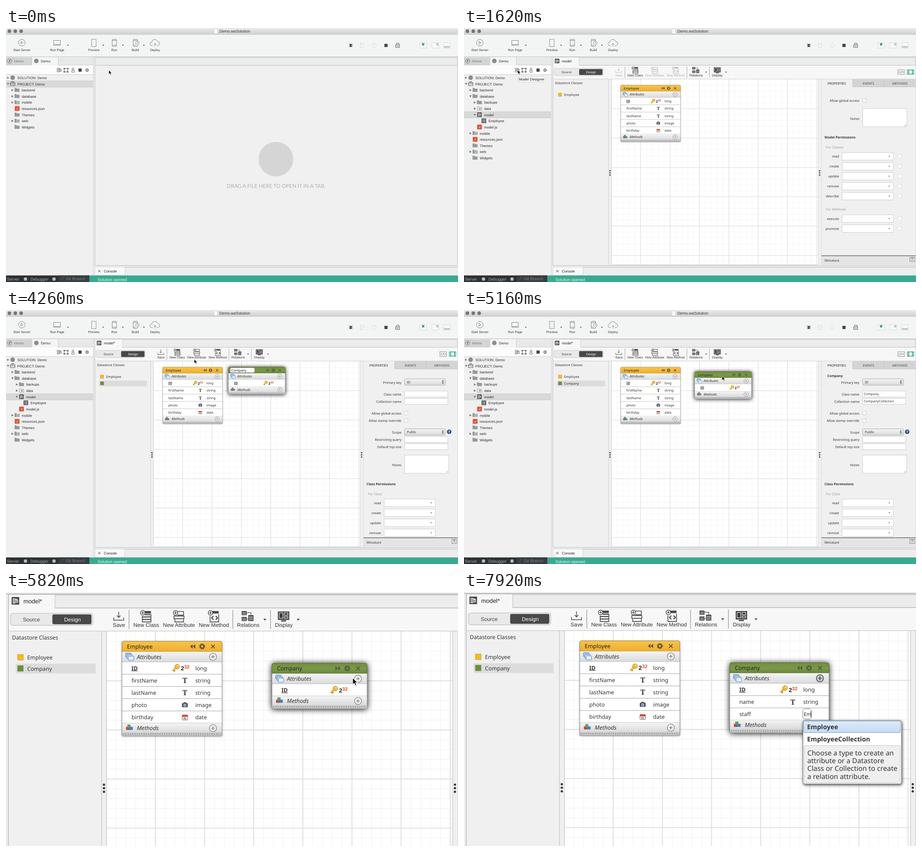
Recreate the animation shown at these times as an HTML page. Size 998 px wide and 561 px high, loop 8 s.

```html
<!DOCTYPE html>
<html lang="en">
<head>
<meta charset="utf-8">
<title>Model designer</title>
<style>
html, body { margin: 0; width: 100%; height: 100%; overflow: hidden; background: #f0f0f0; }
svg { display: block; width: 100vw; height: 100vh; font-family: "Liberation Sans", Arial, sans-serif; text-rendering: geometricPrecision; }
text { white-space: pre; }
.n { font-family: "Noto Sans", "Open Sans", sans-serif; }
.b { font-weight: 700; }
.e { text-anchor: end; }
.m { text-anchor: middle; }
.i { font-style: italic; }
</style>
</head>
<body>
<svg viewBox="0 0 998 561">
  <defs>
    <linearGradient id="bar" x2="0" y2="1"><stop stop-color="#ebebeb"/><stop offset="1" stop-color="#d0d0d0"/></linearGradient>
    <linearGradient id="row" x2="0" y2="1"><stop stop-color="#f4f4f4"/><stop offset="1" stop-color="#dadbdd"/></linearGradient>
    <linearGradient id="gold" x2="0" y2="1"><stop stop-color="#f7c44c"/><stop offset="1" stop-color="#eeae2c"/></linearGradient>
    <linearGradient id="green" x2="0" y2="1"><stop stop-color="#6f8d3c"/><stop offset=".5" stop-color="#7b9a49"/><stop offset="1" stop-color="#698739"/></linearGradient>
    <linearGradient id="blue" x2="0" y2="1"><stop stop-color="#dfebfa"/><stop offset="1" stop-color="#c4daf4"/></linearGradient>
    <clipPath id="panel"><path d="M789 113h208v389h-208z"/></clipPath>
  </defs>
  <g id="view"><g id="chrome"></g><g id="tree"></g><g id="main"></g><g id="company"></g><g id="tip"></g><g id="cursor"></g></g>
  <g id="popup"></g>
</svg>
<script>
const $ = id => document.getElementById(id);
const LOOP = 8000, STEP = 60, ZOOM = 1.674, K = 1 / ZOOM;

// drawing helpers: y of a text is its middle line
const T = (x, y, s, z = 7.1, c = '#333', cls = '', a = '') =>
  `<text x="${x}" y="${y + z * .36}" font-size="${z}" fill="${c}" class="${cls}" ${a}>${s}</text>`;
const N = (x, y, s, z = 7.3, c = '#333', cls = '', a = '') => T(x, y, s, z, c, 'n ' + cls, a);
const R = (x, y, w, h, f, a = '') => `<rect x="${x}" y="${y}" width="${w}" height="${h}" fill="${f}" ${a}/>`;
const B = (x, y, w, h, f = '#fff', s = '#c4c4c4', r = 0, sw = .8) =>
  R(x, y, w, h, f, `stroke="${s}" stroke-width="${sw}" rx="${r}"`);
const C = (x, y, r, f, a = '') => `<circle cx="${x}" cy="${y}" r="${r}" fill="${f}" ${a}/>`;
const L = (d, s = '#666', w = .8, a = '') => `<path d="${d}" fill="none" stroke="${s}" stroke-width="${w}" ${a}/>`;
const F = (d, f = '#555', a = '') => `<path d="${d}" fill="${f}" ${a}/>`;
const at = (x, y, s, html, a = '') => `<g transform="translate(${x} ${y}) scale(${s})" ${a}>${html}</g>`;
const caret = (x, y, c = '#444') => F(`M${x - 2} ${y - 1}h4l-2 2.4z`, c);
const gear = (r, c) => C(0, 0, r * .62, 'none', `stroke="${c}" stroke-width="${r * .45}"`) +
  C(0, 0, r * .9, 'none', `stroke="${c}" stroke-width="${r * .3}" stroke-dasharray="${r * .36} ${r * .347}"`);
const modelIcon = (x, y) => at(x, y, 1, R(-5, -5, 10, 10, '#4b4b4b') +
  L('M-3-2.5h2.5v2h-2.5zM-3 1h2.5v2h-2.5zM1-1h2v3H1zM-.5-2H2v1', '#fff', .8));

function chrome() {
  let s = R(0, 0, 998, 561, '#f0f0f0') + R(0, 0, 998, 14, 'url(#bar)') + R(0, 14, 998, 49, '#f3f5f5') +
    L('M0 14.2H998', '#bcbcbc') + L('M0 63.6H998', '#bbb', 1);
  for (const x of [7.5, 20.5, 33.5]) s += C(x, 7, 3.9, '#79727e');
  s += F('M459.5 2h5l2.5 2.5V12.3h-7.5z', '#fff', 'stroke="#bbb" stroke-width=".5"') + T(471, 7, 'Demo.waSolution', 8.7);
  for (const [x, n] of [[35, 'Start Server'], [113, 'Run Page'], [194, 'Preview'], [239, 'Run'], [285.5, 'Build'], [329, 'Deploy']])
    s += T(x, 48, n, 7.1, '#333', 'm');
  for (const x of [136.5, 214.5, 258, 304.5]) s += caret(x, 38);
  s += C(35, 32.5, 7.3, 'none', 'stroke="#666" stroke-width=".8"') + L('M33 29.5l4.8 3-4.8 3z') +
    B(105.5, 27.5, 14.5, 10.5, '#f8f8f8', '#666') + L('M105.5 36.5h14.5', '#999', 1.4) +
    L('M189 25h10v16h-10z', '#555', 1, 'stroke-dasharray="2 1"') +
    B(234.5, 25, 9.5, 15.5, 'none', '#666', 1) + L('M234.5 27.5h9.5M234.5 38h9.5') +
    B(281, 25, 9.5, 15.5, 'none', '#666', 1) + L('M281 27.5h9.5M281 38h5') +
    C(290, 33.5, 4, '#f3f5f5', 'stroke="#777" stroke-width=".7"') + L('M290 31v2.5h2') +
    L('M324 39h-1.5a4 4 0 0 1-.5-8a6.5 6.5 0 0 1 12.5-1.5a4.7 4.7 0 0 1 0 9.5h-1.5M329 41v-7M326.5 36.5l2.5-2.5 2.5 2.5');
  s += F('M759 35h4.5v7h-4.5z', '#555') + L('M757 34l8.5 8M765.5 34l-8.5 8M756.5 38h9.5', '#555') +
    L('M790 34h-7.5v9h7.5M787 38.5h5', '#ccc') + C(813, 38.5, 4.5, 'none', 'stroke="#ccc" stroke-width=".8"') +
    R(835.5, 35, 7, 7, '#444') + L('M860.5 37h8.5v6h-8.5zM861.5 37l1-3.5h5l1 3.5M862.5 40h4.5', '#555', 1);
  for (const [x, px, py, w, h, c] of [[914, 918.5, 33.5, 5, 5, '#2f9f88'], [940, 950, 33.5, 5, 5, '#c5c5c5'], [966, 967, 40, 13, 3.5, '#c5c5c5']])
    s += B(x, 32.5, 15, 12, '#f8f8f8', '#d2d2d2') + R(px, py, w, h, c);
  // left side
  s += R(0, 65, 192, 18, '#e8e8e8') + R(0, 65, 57, 17, '#d4d4d4') + R(57, 64.5, 58.5, 18.5, '#f4f4f4') +
    L('M57 64.5v17.5H0M115.5 64.5v17.5H192', '#c0c0c0') +
    C(8, 72.8, 4.8, 'none', 'stroke="#666" stroke-width=".9"') + F('M6 75l1.3-3.5 3-1.5-1.3 3.4z', '#555') + T(18, 73, 'Home', 7.9, '#777') +
    C(67, 72.8, 5, '#8b8b8b') + T(77, 73, 'Demo', 7.9) + R(0, 82.5, 192, 20, '#fcfcfc') + L('M0 103H192', '#c4c4c4') +
    L('M113 89h4.5v3H113zM113 94h4.5v3H113zM119 91h3v5h-3zM117.5 90h3v1', '#555', .9) +
    L('M128.5 89.5h8v7.5h-8z', '#555', 1) + L('M127 89.5h3M135 89.5h3M127 97h3M135 97h3', '#444', 1.8) +
    C(148, 90.5, 2.2, 'none', 'stroke="#555" stroke-width=".9"') + L('M145 97.5v-2q0-2.5 3-2.5t3 2.5v2z', '#555', .9) +
    R(160, 89.5, 7, 7, '#444') + at(179, 93, 1, gear(3.7, '#777'));
  // right side and bottom
  s += L('M193 64V546', '#c2c2c2') + R(196, 65, 801, 17, '#ececec') + L('M196.2 65V524.5H997V65zM196 82.3H997', '#bdbdbd', 1) +
    R(196, 528, 802, 18.5, '#ededed') + L('M196 528H998', '#c4c4c4', 1.4) + R(196.5, 527.5, 66, 19, '#f8f8f8', 'stroke="#c8c8c8" stroke-width=".7"') +
    L('M203 534.5l3 2.5-3 2.5M209 534.5l-3 2.5 3 2.5', '#555', 1) + T(216, 537.2, 'Console', 7.9, '#222') +
    R(0, 546.5, 184, 15, '#2c3133') + R(116, 546.5, 68, 15, '#373d40') + R(184, 546.5, 814, 15, '#3aa991') +
    T(2, 555, 'Server', 9.1, '#a8adb0') + T(54, 555, 'Debugger', 9.1, '#a8adb0') + T(132, 554, 'Git Branch', 9.1, '#7d8386') +
    R(39.5, 551, 7, 7, '#b9bcbe', 'rx="2"') + R(102.5, 551, 7, 7, '#b9bcbe', 'rx="2"') +
    L('M120 556h3l3-5h3', '#6d7376', 1, 'stroke-dasharray="2 1"') + T(202, 555.5, 'Solution opened', 9, '#eefaf6');
  return s;
}

// label, depth, arrow (1 closed, 2 open), icon
const CLOSED = [['SOLUTION: Demo', 0, 1, 'logo'], ['PROJECT: Demo', 0, 2, 'case'], ['backend', 1, 1, 'dir'], ['database', 1, 1, 'dir'],
  ['mobile', 1, 1, 'dir+'], ['resources.json', 1, 0, 'js'], ['Themes', 1, 0, 'dir'], ['web', 1, 1, 'dir+'], ['Widgets', 1, 0, 'dir']];
const OPEN = [...CLOSED.slice(0, 3), ['database', 1, 2, 'dir'], ['backups', 2, 1, 'dir'], ['data', 2, 1, 'file'], ['model', 2, 2, 'model'],
  ['Employee', 3, 0, 'table'], ['model.js', 2, 0, 'js'], ...CLOSED.slice(4)];
const dir = F('M-5.5-4.5h4l1 1.5h6v7h-11z', '#959a99');
const ICONS = {
  logo: C(0, 0, 5, '#8b8b8b'),
  case: L('M-5-3H5V4H-5zM-2-3v-2h4v2M-5 0H5', '#555', 1),
  dir, 'dir+': dir + R(-1, -3, 4.5, 6, '#d5d8d8') + R(.3, -2, 2, 4, '#8e9393'),
  file: L('M-4.5-4h3.5l1 1.5h5v6.5h-9.5z', '#888') + R(-1, -1, 4, 3, '#999'),
  js: R(-5, -5.2, 10.4, 10.4, '#df5037') + L('M1-2v3.5h-2.5', '#fff', .9),
  model: modelIcon(0, 0),
  table: R(-5, -5, 10, 10, '#4b4b4b') + L('M-3-2.5h2M0-2.5h3M-3 0h2M0 0h3M-3 2.5h2M0 2.5h3', '#fff', 1.2),
};
function tree(rows, sel) {
  const bar = 110 + 13.62 * sel;
  return R(0, bar - 6.8, 192, 13.6, '#d9d9d9') + L(`M0 ${bar - 6.8}H192M0 ${bar + 6.8}H192`, '#c2c2c2', .7) +
    rows.map(([name, d, arrow, icon], i) => {
      const y = 110 + 13.62 * i, x = 4.5 + 9.7 * d;
      return (arrow === 1 ? F(`M${x - 2} ${y - 2.6}l4.6 2.6-4.6 2.6z`, '#777') : arrow ? F(`M${x - 2.6} ${y - 2}h5.2l-2.6 4.4z`, '#777') : '') +
        at(x + 10.2, y - .3, 1, ICONS[icon]) + T(25 + 9.7 * d, y + .2, name, 7.8, '#2a2a2a');
    }).join('');
}

const empty = () => C(596, 289.7, 38.3, '#d5d5d5') +
  T(596.5, 348.5, 'DRAG A FILE HERE TO OPEN IT IN A TAB.', 11.6, '#b0b0b0', 'm', 'style="font-family:Lato,sans-serif"');

// toolbar icons, drawn around their middle at zoomed size
const plusDot = C(-7.5, -8, 5, '#fafafa', 'stroke="#444" stroke-width="1.4"') + L('M-10.5-8h6M-7.5-11v6', '#444', 1.4);
const tableHead = R(-4, -12, 14.5, 5.5, '#4a4a4a') + L('M-8.5-1V12H10.5V-5', '#4a4a4a', 1.6);
const TOOLS = {
  Save: L('M-.5-10V2M-4.5-2l4 4 4-4M-11.5 2v6H10.5V2', '#4a4a4a', 1.5),
  'New Class': tableHead + L('M-3-4H10M-8.5 1H10.5M-8.5 6.5H10.5', '#4a4a4a', 2.2) + plusDot,
  'New Attribute': L('M-3-11h13v8H-3M-11-1h22v6h-22zM-9 6v6H10V6', '#4a4a4a', 1.6) + plusDot,
  'New Method': tableHead + L('M-1-1l-4 4 4 4M4-1l4 4-4 4', '#4a4a4a', 2.2) + plusDot,
  Relations: R(-14.5, -12, 11, 9, '#4a4a4a') + R(-14.5, 1, 11, 9, '#4a4a4a') + R(0, -3, 11.5, 13, '#4a4a4a') +
    L('M-13-8.5h8M-13-5.500h8M-13 4.500h8M-13 7.500h8M1.500 1h8.500M1.500 4h8.500M1.500 7h8.500'.replaceAll('500', '5'), '#eee', 1) +
    L('M-4-8.5H6v5.500M-4 5.5h4', '#4a4a4a', 1.2),
  Display: R(-13, -11, 25, 18.5, '#3c3c3c') + L('M-10-8h8v12h-8zM1-8h8v5H1zM1 0h8v4H1z', '#eee', 1.2) + R(-6, 8.5, 11, 2.5, '#3c3c3c'),
};
const tool = (x, name, on, hot) => (hot ? R(359, 82.5, 38, 29, '#cfcfcf') : '') +
  at(x, 93.5, .6, TOOLS[name], on || hot ? '' : 'opacity=".35"') + T(x, 104.5, name, 7.1, hot ? '#888' : on ? '#333' : '#b0b0b0', 'm');

// a class card at zoomed size
const TYPES = {
  text: T(0, 0, 'T', 16, '#3a3a3a', 'm b', 'style="font-family:\'Noto Serif\',serif"'),
  photo: R(-6.5, -4, 13, 9, '#4a5560', 'rx="1.5"') + R(-3, -6, 6, 3, '#4a5560') + C(0, .5, 3, '#cfe0ee') + C(0, .5, 1.5, '#4a5560'),
  date: B(-6, -5, 12, 11, '#fff', '#7a4a40', 1, 1) + R(-6, -5, 12, 4, '#cf4a32') + T(0, 2.5, '01', 6, '#333', 'm b'),
};
const key = (x, y) => at(x, y, 1, L('M3-3l-9 9M-4 4l3 3', '#c98a1c', 3.6) + L('M3-3l-9 9', '#f6c04a', 2) +
  C(4, -3.5, 5.3, '#f3b83c', 'stroke="#c98a1c"') + C(5.5, -5, 1.3, '#fff'));
const input = (x, y, w, s, z = 12.2) => B(x, y, w, 22.5, '#fff', '#777', 4.5, 1) + N(x + 2, y + 12, s, z);
const plus = (x, y, hot) => C(x, y, 7.8, hot ? '#ccc' : '#fafafa', `stroke="${hot ? '#555' : '#999'}" stroke-width="1.8"`) +
  L(`M${x - 4} ${y}h8M${x} ${y - 4}v8`, hot ? '#444' : '#888', 1.8);
function card({ x, y, w, fill, name, typing, open = true, rows, live, hot }) {
  const end = 45.5 + 27.1 * rows.length, h = end + 28;
  const shadow = live ? '0 1.5px 7px #000' : '0 1px 2px rgba(0,0,0,.45)';
  const mark = live ? '#545c40' : '#5f5540';
  const head = `M0 23V4q0-4 4-4H${w - 4}q4 0 4 4V23z`;
  let s = R(0, 0, w, h, '#fff', `rx="3" style="filter:drop-shadow(${shadow})"`) +
    F(head, `url(#${fill})`) + L(head, live ? '#4f6130' : '#8f7436', .9) +
    (typing ? B(7, 2.5, 90, 18, '#fff', '#777', 4, 1) : '') + N(11, 11.8, name, 12.4, '#222') +
    F(open ? `M${w - 65} 6.5v10l-5.5-5zM${w - 59} 6.5v10l-5.5-5z` : `M${w - 70} 6.5v10l5.5-5zM${w - 64} 6.5v10l5.5-5z`, mark) +
    at(w - 44, 11.5, 1, gear(6.3, mark)) + L(`M${w - 24} 7.5l8 8M${w - 16} 7.5l-8 8`, mark, 2) +
    R(0, 23, w, 22.5, 'url(#row)') + L(`M0 45.5H${w}`, '#aaa') +
    B(8, 26, 12, 9, '#a9c8ee', '#4f80bd', 1, 1) + B(11, 29.5, 12, 9, '#c4dbf5', '#4f80bd', 1, 1) + B(14, 33, 12, 9, '#e8f2fd', '#4f80bd', 1, 1) +
    N(33, 34.3, 'Attributes', 12.6, '#333', 'i') + plus(w - 20, 34.3, hot);
  rows.forEach(([label, kind, type, edit, w2], i) => {
    const top = 45.5 + 27.1 * i, mid = top + 13.9;
    s += L(`M0 ${top + 27.1}H${w}`, '#999', .9);
    if (edit === 'name') s += input(20, top + 2, 75, label);
    else s += N(21, mid, label, 12.2, '#333', kind === 'key' ? 'b' : '', kind === 'key' ? 'text-decoration="underline"' : '');
    if (edit === 'type') s += input(161, top + 2, w2, type, 11.4);
    else if (open) s += N(162, mid, type, 12.2);
    if (kind === 'key') {
      const kx = open ? 118 : 136;
      s += key(kx, mid) + T(kx + 12, mid + .5, '2', 13, '#222', 'b') + T(kx + 19.3, mid - 3, '32', 10.8, '#d8502c', 'b');
    } else if (kind) s += at(139, mid, 1, TYPES[kind]);
  });
  s += R(0, end, w, 20, 'url(#row)') + R(9, end + 8, 8, 7, '#cf4338', 'rx="1"') + R(12, end + 3, 7, 7, '#5aa84f', 'rx="1"') + R(16, end + 8, 8, 7, '#4a7fc6', 'rx="1"') +
    N(33, end + 10.8, 'Methods', 12.6, '#333', 'i') + plus(w - 20, end + 10.8) +
    R(0, end + 20, w, 8, '#c9c9cb') + L(`M3 ${end + 24}H${w - 2}`, '#8c8c8c', 2.5, 'stroke-dasharray="2 3"') +
    L(`M0 23V${h}H${w}V23`, '#888', .9);
  return at(x, y, K, s);
}
const EMPLOYEE = card({ x: 346, y: 126.2, w: 221, fill: 'gold', name: 'Employee', rows: [['ID', 'key', 'long'],
  ['firstName', 'text', 'string'], ['lastName', 'text', 'string'], ['photo', 'photo', 'image'], ['birthday', 'date', 'date']] });

// property panel parts
const check = (x, y, c = '#bbb') => B(x, y - 4, 7.8, 7.8, '#fff', c, 1.5);
const access = (names, y0, box) => names.map((n, i) => {
  const y = y0 + 22 * i;
  return N(828, y, n, 7.3, '#333', 'e') + B(835, y - 8.3, 113, 16.6) + caret(939, y, '#777') + (box ? check(958, y, '#d4d4d4') : '');
}).join('');
const grip = (x, y) => L(`M${x - 4} ${y}l4-4M${x - 2} ${y}l2-2`, '#888', .7);
const modelPanel = () => N(873, 160, 'Allow global access', 7.3, '#333', 'e') + check(880.5, 160) + N(873, 200, 'Notes', 7.3, '#333', 'e') +
  B(880.5, 178, 97.5, 40) + grip(976.5, 216.5) + N(796, 241, 'Model Permissions', 7.3, '#333', 'b') + N(799.5, 263.5, 'For Classes', 7.3, '#999') +
  access(['read', 'create', 'update', 'remove', 'describe'], 283.5, true) + N(799.5, 400.5, 'For Methods', 7.3, '#999') + access(['execute', 'promote'], 421, true);
function classPanel(name) {
  const pick = (y, s) => B(880, y - 7, 90, 14, 'url(#row)', '#999', 2) + N(885, y, s) + F(`M962.5 ${y - 1}l2-3 2 3zM962.5 ${y + 1}l2 3 2-3z`, '#333');
  const field = (y, s) => B(880, y - 6.5, 95.5, 13) + N(883, y - .5, s);
  return [['Primary key', 160], ['Class name', 186], ['Collection name', 202], ['Allow global access', 228], ['Allow stamp override', 244.5],
    ['Scope', 270], ['Restricting query', 286.5], ['Default top size', 302.5], ['Notes', 342.5]].map(([s, y]) => N(873, y, s, 7.3, '#333', 'e')).join('') +
    N(802, 145.5, name, 7.3, '#333', 'b') + pick(159, 'ID') + field(185.5, name) + field(201.7, name && name + 'Collection') + check(879.5, 228) + check(879.5, 244.5) +
    pick(269.5, 'Public') + C(978.5, 269, 5, '#2c4f9e') + T(978.5, 269, '?', 8, '#fff', 'm b') + field(286, '') + field(302, '') +
    B(880, 320.5, 97.5, 40) + grip(976, 359) + N(796, 384, 'Class Permissions', 7.3, '#333', 'b') + N(799.5, 406, 'For Class', 7.3, '#999') +
    access(['read', 'create', 'update', 'remove'], 426);
}

function grid() {
  let minor = '', major = '';
  for (let i = 1; i < 36; i++) {
    const p = 12.96 * i, line = `M${325.4 + p} 113V523` + (p < 410 ? `M326 ${113.5 + p}H782` : '');
    if (i % 5) minor += line; else major += line;
  }
  return R(326, 113, 456.5, 410, '#fff') + L(minor, '#f2f2f2', .7) + L(major, '#e1e1e1', 1.3);
}
const GRID = grid();
const tab = dirty => R(196.6, 64.5, dirty ? 61 : 57.5, 18.5, '#f7f7f7', 'stroke="#c4c4c4" stroke-width=".7"') +
  R(197, 81.5, dirty ? 60 : 56.5, 2, '#f7f7f7') + modelIcon(205.5, 72.8) + T(216, 73, dirty ? 'model*' : 'model', 7.9, '#222');
const swatch = (y, c, name) => R(208.3, y - 3.9, 7.6, 7.6, c, 'stroke="#666" stroke-opacity=".5" stroke-width=".5"') + N(221, y + .2, name);

function designer({ dirty, added, hover, name }) {
  let s = tab(dirty) + R(197, 83, 800, 29.5, '#f7f7f7') + B(199.2, 89.3, 108.5, 15.8, '#e9e9e9', '#c2c2c2', 3) + R(254.2, 90.7, 51.6, 13, '#484848', 'rx="2"') +
    T(226.5, 97.2, 'Source', 7.1, '#444', 'm') + T(280.7, 97.2, 'Design', 7.1, '#fff', 'm') + L('M355.3 85v25M492.2 85v25M542 85v25', '#999', .8) +
    tool(342, 'Save', dirty) + tool(378, 'New Class', true, hover) + tool(421.2, 'New Attribute', added) + tool(467.3, 'New Method', added) +
    tool(512.6, 'Relations', true) + tool(559.5, 'Display', true) + caret(534.5, 97.5) + caret(578.5, 97.5) +
    B(958, 92, 14.5, 10.5, '#f7f7f7', '#777') + L('M962.5 95l-2.5 2.3 2.5 2.3M968 95l2.5 2.3-2.5 2.3M966 94.5l-1.5 5.5', '#555', .9) +
    B(979, 92.5, 14, 9.5, '#fff', '#2f9f88', 0, 1.4) + L('M982 92v10M990 92v10', '#2f9f88', 1.8) +
    R(197, 112.5, 122.5, 410.5, '#f0f0f0') + GRID + L('M197 112.8H997M319.2 113V523M325.6 113V523M782.2 113V523M789.2 113V523M326 522.7H782', '#c6c6c6') +
    N(201, 121.5, 'Datastore Classes');
  if (added) s += R(206, 155.8, 105.3, 12.8, '#dcdcdc') + swatch(162.1, '#6c9035', name);
  s += swatch(147.4, '#fcb813', 'Employee');
  for (const y of [315.3, 320, 324.7]) s += C(322.3, y, 1.5, '#333') + C(785.2, y, 1.5, '#333');
  return s + EMPLOYEE + `<g clip-path="url(#panel)">${R(789.5, 113, 207.5, 390, '#f0f0f0')}${R(858, 113, 139, 17, '#d4d4d4')}` +
    L('M858 113v17H997M927.5 113v17', '#bcbcbc') + N(823, 122, 'PROPERTIES', 7, '#222', 'm') + N(893, 122, 'EVENTS', 7, '#444', 'm') + N(962.5, 122, 'METHODS', 7, '#444', 'm') +
    (added ? classPanel(name) : modelPanel()) + '</g>' + R(789.5, 502.5, 207.5, 20, '#e4e4e4') + L('M789.5 503H997', '#8a8a8a', 1.8) +
    N(796, 513, 'Miniature', 7.2) + B(984.5, 506.5, 10.5, 9, '#f4f4f4', '#666') + L('M986.5 508.5h6.5M987 513.5l2.8-3 2.8 3', '#444', 1);
}

const tip = (x, y, w, h, s, z) => B(x, y, w, h, '#fdfdfd', '#c0c0c0', .5, .7) + T(x + 2, y + h / 2, s, z, '#111');

function popup() {
  const lines = ['Choose a type to create an', 'attribute or a Datastore', 'Class or Collection to create', 'a relation attribute.'];
  return R(748.5, 284, 217.5, 140, '#fff', 'rx="4" stroke="#777" style="filter:drop-shadow(1px 2px 3px rgba(0,0,0,.75))"') +
    B(750, 285, 213.5, 25.5, 'url(#blue)', '#7f9cc0', 2, 1) + N(757.5, 297.5, 'Employee', 14.2, '#333', 'b') +
    N(757.5, 324.5, 'EmployeeCollection', 14.2, '#333', 'b') + B(751, 339, 212, 82.5, '#efefef', '#c4c4c4', 2, 1) +
    lines.map((s, i) => N(758, 355 + 17.4 * i, s, 15.3)).join('');
}

const ramp = (t, a, b) => Math.min(1, Math.max(0, (t - a) / (b - a)));
const smooth = p => p * p * (3 - 2 * p);
const out = p => 1 - (1 - p) ** 2;
const START = [491, 126], DROP = [543.9, 155.1];
// from ms, to ms, from x y, to x y, easing
const MOVES = [[0, 360, 227, 93, 118.5, 92.5], [1980, 2520, 118.5, 92.5, 382, 102],
  [4140, 4560, 382, 102, 551.5, 136], [5640, 5940, 604.2, 165.2, 659, 176, out]];

function pointer(t, drag) {
  if (t >= 4980 && t < 5640) return [START[0] + 60.5 + drag[0], START[1] + 10 + drag[1]];
  const [a, b, x, y, u, v, ease = smooth] = MOVES.findLast(m => t >= m[0]);
  const p = ease(ramp(t, a, b));
  return [x + (u - x) * p, y + (v - y) * p];
}

function companyRows(t) {
  const rows = [['ID', 'key', 'long']];
  if (t >= 6600) rows.push(['name', 'text', 'string']);
  if (t >= 7560) {
    const typed = t < 7620 ? '' : t < 7800 ? 'E' : 'Em';
    rows.push(['staff', '', typed, 'type', typed === 'Em' ? 19 : 11]);
  } else if (t >= 6120) rows.push([t >= 7440 ? 'staff' : '', '', '', 'name']);
  return rows;
}

const last = {};
function put(id, html) {
  if (last[id] !== html) $(id).innerHTML = last[id] = html;
}

function draw(ms) {
  const t = Math.floor(ms / STEP) * STEP;
  const opened = t >= 1440, named = t >= 4620;
  const zoom = smooth(ramp(t, 5160, 5460)), settle = t >= 6600 ? 1 : 0;
  $('view').setAttribute('transform', `translate(${-323.2 * zoom - .4 * settle} ${-102.4 * zoom - settle}) scale(${1 + (ZOOM - 1) * zoom})`);
  put('tree', opened ? tree(OPEN, 6) : tree(CLOSED, 1));
  put('main', !opened ? empty() : t < 1560 ? tab(false) : designer({
    dirty: t >= 3480, added: t >= 3540, hover: t >= 2460 && t < 4260, name: named ? 'Company' : '' }));

  const d = ramp(t, 5000, 5460), drag = [0, 1].map(i => (DROP[i] - START[i]) * d);
  const wide = t >= 6240;
  put('company', t < 3480 ? '' : card({
    x: START[0] + drag[0], y: START[1] + drag[1], w: wide ? 219 : 210, fill: 'green', open: wide, live: true,
    name: 'Company'.slice(0, Math.max(0, (t - 3720) / STEP)), typing: !named, rows: companyRows(t), hot: t >= 5940 }));

  put('tip', t >= 900 && t < 2040 ? tip(119, 107.5, 61, 11.5, 'Model Designer', 8.1) :
    t >= 3360 && t < 3480 ? tip(383, 117, 41, 11, 'New Class', 7.8) : '');
  const [x, y] = pointer(t, drag);
  put('cursor', t >= 6600 ? '' : at(x, y, 1, F('M0 0v9.2l2.1-2 1.5 3.4 1.7-.7-1.5-3.3h2.9z', '#111', 'stroke="#fff" stroke-width=".7"')));

  const blink = (t >= 6900 && t < 7080) || (t >= 7260 && t < 7440);
  put('popup', (t >= 7620 ? popup() : '') + (blink ? L('M609.3 260v20', '#222', 1.2) : '') + (t >= 7920 ? L('M766 263v14', '#222', 1) : ''));
}

put('chrome', chrome());
let begin;
function frame(now) {
  begin ??= now;
  draw((now - begin) % LOOP);
  requestAnimationFrame(frame);
}
draw(0);
requestAnimationFrame(frame);
</script>
</body>
</html>
```
